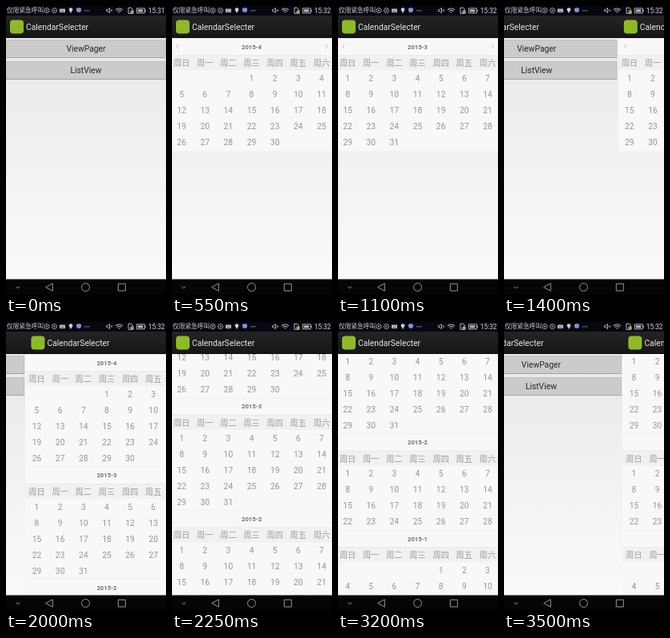
These frames come from a looping animation (200 by 360 pixels, 3.55 s). An HTML page with a canvas:

```html
<!DOCTYPE html>
<html lang="zh">
<head>
<meta charset="utf-8">
<style>
html, body { margin: 0; width: 100%; height: 100%; overflow: hidden; background: #000; }
canvas { display: block; width: 200px; height: 360px; }
</style>
</head>
<body>
<canvas id="stage"></canvas>
<script>
const canvas = document.getElementById('stage');
const ctx = canvas.getContext('2d');
const ratio = window.devicePixelRatio || 1;
canvas.width = 200 * ratio;
canvas.height = 360 * ratio;

const LOOP = 3550, STEP = 50;
const LEFT = -2.5, PAGE = 204;      // the phone screen is a little wider than the stage
const COL = PAGE / 7, ROW = 20, HEAD = 20.5;
const TOP = 41, BOTTOM = 341.5;
const SANS = 'Roboto, "Noto Sans CJK SC", "Noto Sans CJK", sans-serif';
const DAYS = '日一二三四五六';

const easeOut = (t, start, length, power) =>
  1 - Math.pow(1 - Math.min(1, Math.max(0, (t - start) / length)), power);

function rect(x, y, w, h, color) {
  ctx.fillStyle = color;
  ctx.fillRect(x, y, w, h);
}

function text(str, x, y, size, color, align = 'center', weight = 400) {
  ctx.font = `${weight} ${size}px ${SANS}`;
  ctx.fillStyle = color;
  ctx.textAlign = align;
  ctx.fillText(str, x, y);
}

function line(points, color, width = 1, close = false) {
  ctx.beginPath();
  points.forEach(([x, y]) => ctx.lineTo(x, y));
  if (close) ctx.closePath();
  ctx.strokeStyle = color;
  ctx.lineWidth = width;
  ctx.stroke();
}

function ring(x, y, r, color, width = 1, from = 0, to = Math.PI * 2) {
  ctx.beginPath();
  ctx.arc(x, y, r, from, to);
  ctx.strokeStyle = color;
  ctx.lineWidth = width;
  ctx.stroke();
}

function shade(y0, y1, c0, c1) {
  const g = ctx.createLinearGradient(0, y0, 0, y1);
  g.addColorStop(0, c0);
  g.addColorStop(1, c1);
  return g;
}

function clipped(x, y, w, h, draw) {
  ctx.save();
  ctx.beginPath();
  ctx.rect(x, y, w, h);
  ctx.clip();
  draw();
  ctx.restore();
}

function actionBar(x) {
  rect(x + LEFT, 12, PAGE + 1, 28, shade(12, 40, '#242424', '#161616'));
  rect(x + LEFT, 39, PAGE + 1, 1, '#0c0c0c');
  ctx.beginPath();
  ctx.roundRect(x + 5, 17.5, 17, 17, 4);
  ctx.fillStyle = '#8fb92c';
  ctx.fill();
  text('CalendarSelecter', x + 25, 30.3, 10.3, '#e8e8e8', 'left');
}

function button(x, y, label) {
  rect(x - .5, y, 201, 23, '#b6b6b6');
  rect(x + .3, y + .6, 199.4, 21.4, '#cbcbcb');
  rect(x - .5, y + 22, 201, 1, '#a2a2a2');
  text(label, x + 100, y + 15.3, 10.3, '#262626');
}

function home(x) {
  actionBar(x);
  button(x, 42, 'ViewPager');
  button(x, 69, 'ListView');
}

// Draws one month and returns its height.
function month(x, y, number, arrows) {
  const first = new Date(2015, number - 1, 1).getDay();
  const count = new Date(2015, number, 0).getDate();
  const rows = Math.ceil((first + count) / 7);
  const height = HEAD + ROW * (rows + 1);
  const colX = i => x + LEFT + COL * (i + .5);

  rect(x + LEFT, y, PAGE, height, '#f8f8f8');
  rect(x + LEFT, y + HEAD, PAGE, ROW - 1, '#f1f1f1');
  rect(x + LEFT, y + HEAD, PAGE, .7, '#e6e6e6');
  text('2015-' + number, x + 99.5, y + 12.8, 7.7, '#70707a', 'center', 700);
  if (arrows) {
    for (const [ax, d] of [[7, 1.3], [193, -1.3]])
      line([[x + ax + d, y + 6.7], [x + ax - d, y + 9.5], [x + ax + d, y + 12.3]], '#bcbcbc', 1);
  } else {
    rect(x + LEFT, y - .8, PAGE, .8, '#ececec');
  }
  for (let i = 0; i < 7; i++)
    text('周' + DAYS[i], colX(i), y + HEAD + 13.7, 10.2, '#9a9a9a');
  for (let day = 1; day <= count; day++) {
    const cell = first + day - 1;
    text(day, colX(cell % 7), y + HEAD + ROW * (1 + Math.floor(cell / 7)) + 12.6, 10.3, '#959595');
  }
  return height;
}

function pager(x, swipe) {
  actionBar(x);
  clipped(x + LEFT, TOP - 1, PAGE, BOTTOM - TOP + 1, () => {
    if (swipe < 1) month(x + swipe * PAGE, TOP, 4, true);
    if (swipe > 0) month(x + (swipe - 1) * PAGE, TOP, 3, true);
  });
}

function list(x, scroll) {
  actionBar(x);
  clipped(x + LEFT, TOP - 1, PAGE, BOTTOM - TOP + 1, () => {
    let y = TOP - scroll;
    for (let n = 4; n > 0; n--) y += month(x, y, n, false);
  });
}

function statusBar(clock) {
  const c = '#b8b8c0';
  rect(0, 0, 200, 12, '#070712');
  text('仅限紧急呼叫', 1, 8.4, 7.7, '#cacad0', 'left');
  for (const x of [51, 60.5]) {
    ring(x, 5.6, 3, c, .9);
    rect(x - .9, 4.7, 1.8, 1.8, c);
  }
  rect(67, 3.5, 7, 4.5, c);
  rect(68.3, 6.2, 4.4, .7, '#444');
  ctx.fillStyle = '#d0d0d8';
  ctx.beginPath();
  ctx.arc(81, 4.6, 2.4, Math.PI, 0);
  ctx.lineTo(81, 9);
  ctx.fill();
  ctx.fillStyle = '#7f93d8';
  ctx.beginPath();
  ctx.arc(91, 5, 3, 0, Math.PI);
  ctx.lineTo(88, 3);
  ctx.lineTo(91, 2);
  ctx.lineTo(94, 3);
  ctx.fill();
  for (let i = 0; i < 3; i++) rect(98.3 + i * 2.4, 5.2, 1.2, 1.2, c);

  line([[125.5, 4.6], [127, 4.6], [129.5, 2.5], [129.5, 8.5], [127, 6.6], [125.5, 6.6]], c, .9, true);
  line([[130.8, 4.3], [133, 6.8]], c, .8);
  line([[133, 4.3], [130.8, 6.8]], c, .8);
  for (const r of [1.2, 3.6, 6]) ring(141.5, 9, r, c, 1.2, -2.4, -.74);
  line([[153, 2.2], [156.5, 2.2], [158.2, 4], [158.2, 9.3], [153, 9.3]], c, 1, true);
  rect(155.5, 5.6, 4.2, 4.2, '#b99a58');
  line([[163.3, 2.9], [173.3, 2.9], [173.3, 8.8], [163.3, 8.8]], c, 1, true);
  rect(164.8, 4.3, 6.4, 3.1, c);
  rect(173.6, 4.8, 1.2, 2.1, c);
  text(clock, 198.5, 8.9, 8.3, '#d6d6dc', 'right');
}

function navBar() {
  const c = '#979797';
  rect(0, BOTTOM, 200, 19, '#050505');
  line([[12.3, 350.7], [14.7, 352.8], [17.1, 350.7]], c, 1);
  line([[58.3, 346.8], [58.3, 356.2], [49.6, 351.5]], c, 1, true);
  ring(99.5, 351.5, 5, c, 1);
  line([[140.3, 347.2], [149.3, 347.2], [149.3, 356], [140.3, 356]], c, 1, true);
}

function render(t) {
  ctx.setTransform(ratio, 0, 0, ratio, 0, 0);
  rect(0, 0, 200, 360, '#000');
  rect(0, 40, 200, 302, shade(40, 342, '#e8e8e8', '#fafafa'));

  // How far the second screen covers the home screen.
  const pagerSlide = easeOut(t, 0, 500, 4) - easeOut(t, 1267, 500, 4);
  const listSlide = easeOut(t, 1800, 500, 4) - easeOut(t, 3358, 500, 4);
  const inList = t > 1800;
  const slide = inList ? listSlide : pagerSlide;
  const x = (1 - slide) * PAGE;

  if (slide < 1) home(x - PAGE);
  if (slide > 0) {
    if (inList) list(x, 181.7 * easeOut(t, 2200, 260, 3));
    else pager(x, easeOut(t, 550, 500, 3));
  }
  statusBar(t < 300 ? '15:31' : '15:32');
  navBar();
}

function tick() {
  const t = performance.now() % LOOP;
  render(Math.floor(t / STEP) * STEP);
  requestAnimationFrame(tick);
}
tick();
</script>
</body>
</html>
```
